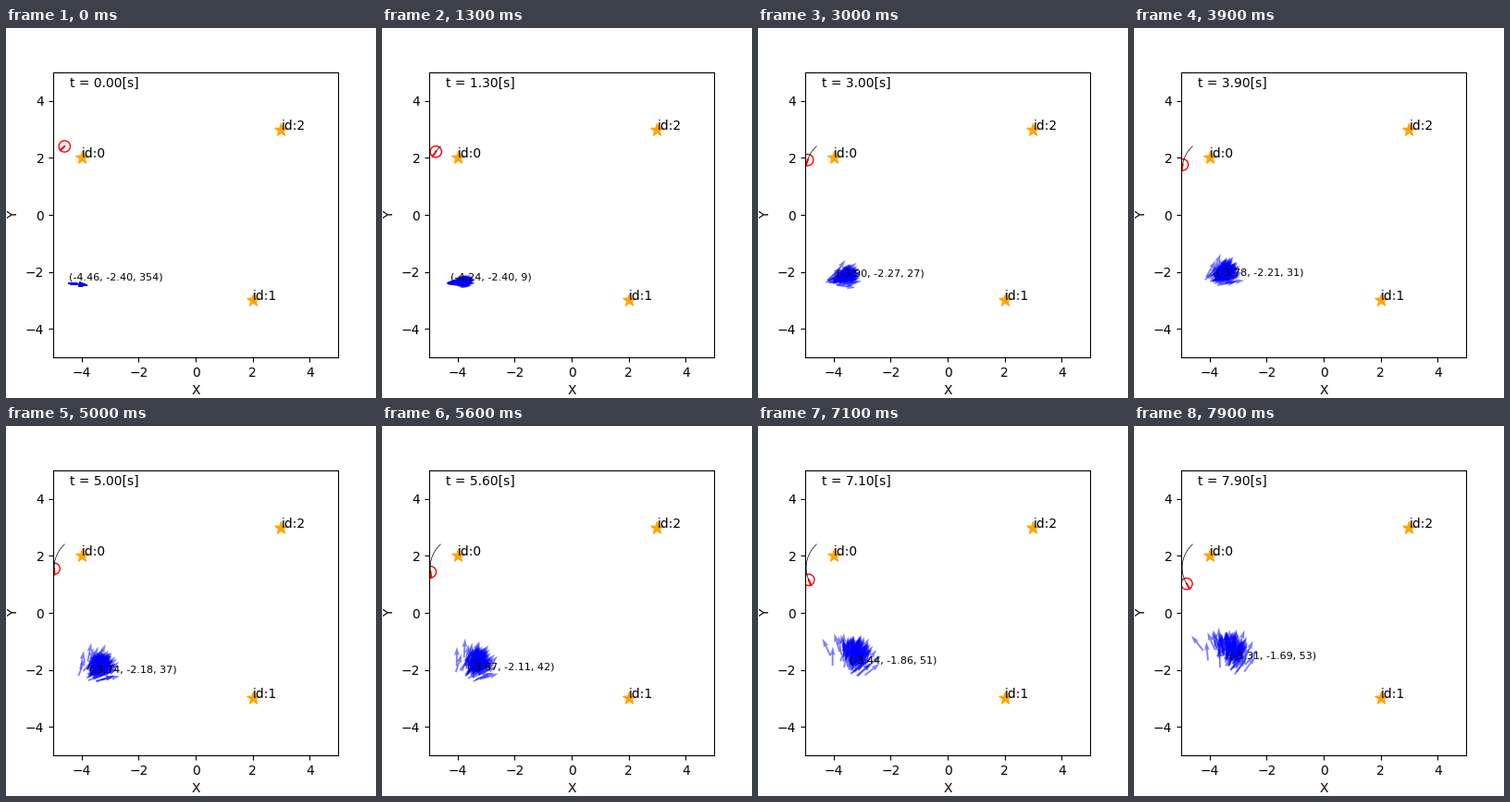
These frames come from a looping animation (400 px wide and 400 px high, 8000 ms). A matplotlib script:

```python
import numpy as np
import matplotlib.pyplot as plt
from matplotlib.animation import FuncAnimation
from matplotlib.patches import Circle

DT, STEPS, COUNT = 0.1, 80, 100
NU, OMEGA = 0.2, np.radians(10)
START = np.array([-4.46, -2.40, np.radians(-6)])
NOISE = [0.17, 0.001, 0.13, 0.2]

# Key poses of the labelled particle: time, x, y, degrees
BEST = np.array([(0, -4.46, -2.40, -6), (1.3, -4.24, -2.40, 9),
                 (3.0, -3.90, -2.27, 27), (3.9, -3.78, -2.212, 31),
                 (5.0, -3.74, -2.18, 37), (6.2, -3.59, -2.04, 48),
                 (7.9, -3.31, -1.692, 53)])


def move(pose, nu, omega):
    """Advance poses (..., 3) along circular arcs for one time step."""
    x, y, th = np.moveaxis(pose, -1, 0)
    end = th + omega * DT
    r = nu / omega
    return np.stack([x + r * (np.sin(end) - np.sin(th)),
                     y + r * (np.cos(th) - np.cos(end)), end], axis=-1)


def particle_tracks():
    rng = np.random.default_rng(12)
    a, b = np.sqrt(NU / DT), np.sqrt(OMEGA / DT)
    tracks = np.empty((STEPS, COUNT, 3))
    tracks[0] = START
    for i in range(1, STEPS):
        n = rng.normal(0, NOISE, (COUNT, 4))
        nu = NU + n[:, 0] * a + n[:, 1] * b
        omega = OMEGA + n[:, 2] * a + n[:, 3] * b
        # one straggler starts slowly and turns faster
        nu[1], omega[1] = 0.05 + 0.03 * i * DT, np.radians(17)
        tracks[i] = move(tracks[i - 1], nu, omega)
    t, *pose = BEST.T
    for k, col in enumerate(pose):
        tracks[:, 0, k] = np.interp(np.arange(STEPS) / 10, t, col)
    tracks[:, 0, 2] = np.radians(tracks[:, 0, 2])
    return tracks


def robot_track():
    poses = [np.array([-4.60, 2.405, np.radians(222)])]
    for _ in range(STEPS - 1):
        poses.append(move(poses[-1], 0.192, OMEGA))
    return np.array(poses)


particles, robot = particle_tracks(), robot_track()

fig = plt.figure(figsize=(4, 4), dpi=100)
ax = fig.add_subplot(111)
ax.set_aspect("equal")
ax.set(xlim=(-5, 5), ylim=(-5, 5))
ax.set_xlabel("X", fontsize=10)
ax.set_ylabel("Y", fontsize=10)

for k, (x, y) in enumerate([(-4, 2), (2, -3), (3, 3)]):
    ax.scatter(x, y, s=100, marker="*", color="orange")
    ax.text(x, y, f"id:{k}", fontsize=10)

elems = []


def draw(i):
    while elems:
        elems.pop().remove()
    elems.append(ax.text(-4.4, 4.5, f"t = {i * DT:.2f}[s]", fontsize=10))

    x, y, th = robot[i]
    elems.extend(ax.plot([x, x + 0.2 * np.cos(th)],
                         [y, y + 0.2 * np.sin(th)], color="red"))
    elems.append(ax.add_patch(Circle((x, y), 0.2, fill=False, color="red")))
    elems.extend(ax.plot(robot[:i + 1, 0], robot[:i + 1, 1],
                         lw=0.5, color="black"))

    px, py, pt = particles[i].T
    elems.append(ax.quiver(px, py, np.cos(pt), np.sin(pt), angles="xy",
                           scale_units="xy", scale=1.5,
                           color="blue", alpha=0.5))
    deg = int(round(np.degrees(pt[0]))) % 360
    elems.append(ax.text(px[0], py[0] + 0.1,
                         f"({px[0]:.2f}, {py[0]:.2f}, {deg})", fontsize=8))
    return elems


anim = FuncAnimation(fig, draw, frames=STEPS, interval=100,
                     repeat=True, repeat_delay=0)
plt.show()
```
